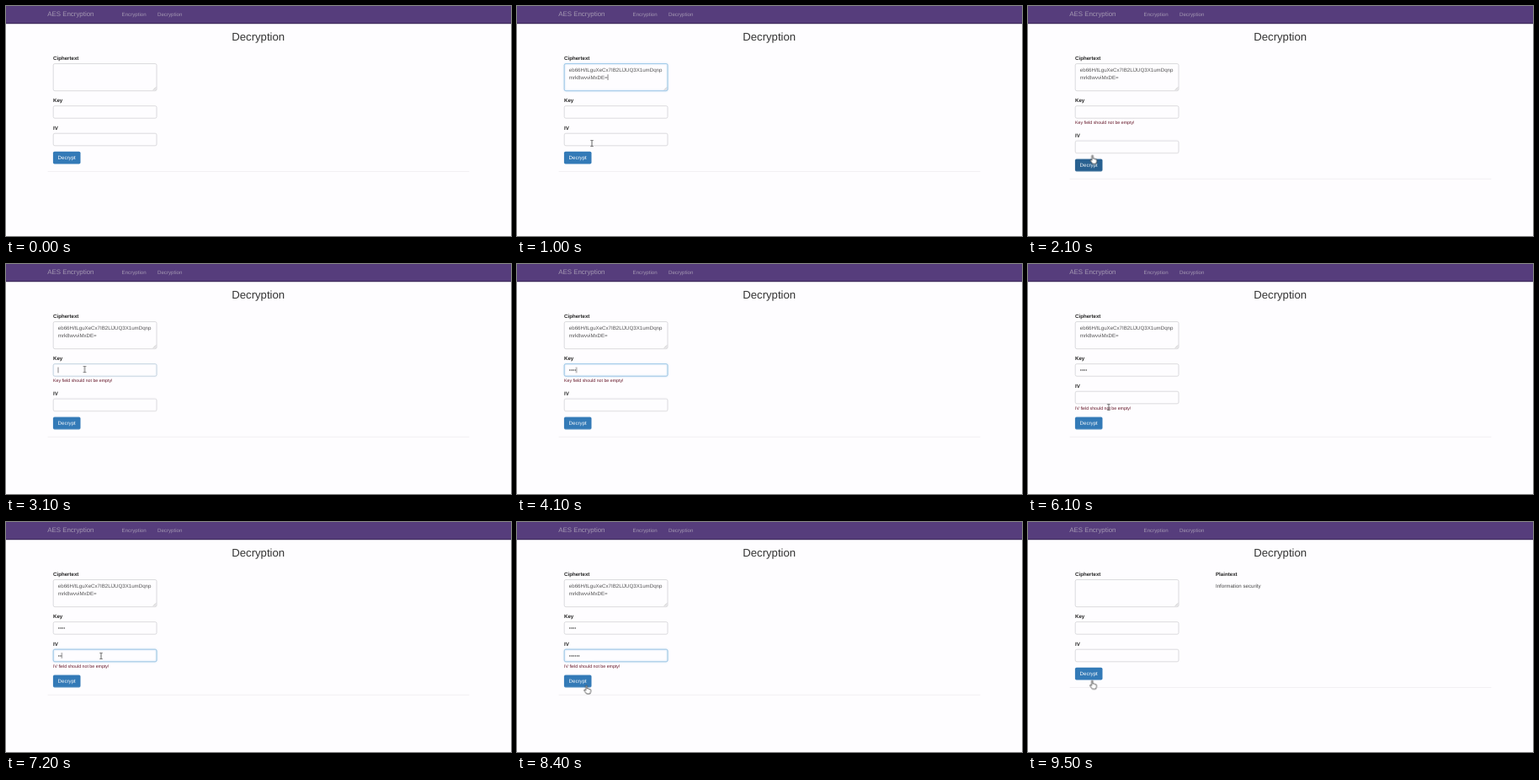
Write an HTML page that moves like this. It is 600x273 px and loops after 10 s.

```html
<!DOCTYPE html>
<html lang="en">
<head>
<meta charset="utf-8">
<title>AES Decryption</title>
<style>
html, body { margin: 0; height: 100%; overflow: hidden; background: #fefdff; }
svg { display: block; width: 100%; height: 100%; }
text {
  font: 6.15px "Liberation Sans", Arial, sans-serif;
  text-rendering: geometricPrecision;
  fill: #555; white-space: pre;
}
.brand { font-size: 7.9px; }
.nav text { fill: #a498b2; }
.title { font-size: 13.18px; text-anchor: middle; fill: #333; }
.label { font-weight: bold; fill: #222; }
.error { font-size: 5.27px; fill: #641426; }
.box { fill: #fefdff; stroke: #c4c4c8; stroke-width: .6; }
.glow { fill: none; stroke: #8fc4ec; stroke-width: .7; filter: drop-shadow(0 0 1px #a9d3f2); }
.caret { stroke: #333; stroke-width: .6; }

/* One percent of the loop is 100 ms. */
.step { animation: 10s step-end infinite; }
.ease { animation: 10s linear infinite; }

.cipher { animation-name: cipher; }
.cipherCaret { animation-name: cipherCaret; }
.keyCaret { animation-name: keyCaret; }
.ivCaret { animation-name: ivCaret; }
.keyType { animation-name: keyType; }
.ivType { animation-name: ivType; }
.keyError { animation-name: keyError; }
.ivError { animation-name: ivError; }
.ivGroup { animation-name: ivGroup; }
.footer { animation-name: footer; }
.plain { animation-name: plain; }
.cipherGlow { animation-name: cipherGlow; }
.keyGlow { animation-name: keyGlow; }
.ivGlow { animation-name: ivGlow; }
.button { fill: #337ab7; animation-name: hover; }
.pointer { animation-name: move; }
.arrow { animation-name: arrow; }
.beam { animation-name: beam; }
.hand { animation-name: hand; }

@keyframes cipher { 0%, 92% { opacity: 0 } 9% { opacity: 1 } }
@keyframes cipherCaret {
  0%, 19% { opacity: 0; transform: none }
  7% { opacity: 1; transform: translate(-46px, -8.8px) }
  9% { opacity: 1; transform: none }
}
@keyframes keyCaret { 0%, 55% { opacity: 0 } 31% { opacity: 1 } }
@keyframes ivCaret { 0%, 82% { opacity: 0 } 67% { opacity: 1 } }
@keyframes keyType {
  0%, 92% { transform: none }
  34% { transform: translateX(2.15px) }
  36% { transform: translateX(4.3px) }
  38% { transform: translateX(6.45px) }
  40% { transform: translateX(8.6px) }
}
@keyframes ivType {
  0%, 92% { transform: none }
  70% { transform: translateX(2.15px) }
  71% { transform: translateX(4.3px) }
  73% { transform: translateX(6.45px) }
  75% { transform: translateX(8.6px) }
  76% { transform: translateX(10.75px) }
  78% { transform: translateX(12.9px) }
}
@keyframes keyError { 0%, 57% { opacity: 0 } 20% { opacity: 1 } }
@keyframes ivError { 0%, 92% { opacity: 0 } 57% { opacity: 1 } }
@keyframes ivGroup { 0%, 57% { transform: none } 20% { transform: translateY(8.8px) } }
@keyframes footer { 0%, 92% { transform: none } 20% { transform: translateY(8.8px) } }
@keyframes plain { 0% { opacity: 0 } 92% { opacity: 1 } }
@keyframes hover {
  0%, 30%, 59%, 95% { fill: #337ab7 }
  13%, 50%, 86% { fill: #286090 }
}
@keyframes cipherGlow { 0%, 7%, 20.5%, 100% { opacity: 0 } 8.5%, 19% { opacity: 1 } }
@keyframes keyGlow { 0%, 30.5%, 56.5%, 100% { opacity: 0 } 32%, 55% { opacity: 1 } }
@keyframes ivGlow { 0%, 67%, 91.5%, 100% { opacity: 0 } 68.5%, 90% { opacity: 1 } }

@keyframes move {
  0%, 5% { transform: translate(104px, 8px) }
  7% { transform: translate(104px, 84px) }
  9% { transform: translate(98px, 100px) }
  10%, 10.9% { transform: translate(89px, 163px) }
  12% { transform: translate(80px, 178px) }
  15% { transform: translate(77px, 177px) }
  16%, 20% { transform: translate(76px, 176px) }
  26%, 29% { transform: translate(79px, 184px) }
  30% { transform: translate(85px, 162px) }
  31%, 45% { transform: translate(93.5px, 125px) }
  48% { transform: translate(82px, 165px) }
  52%, 57% { transform: translate(71.6px, 190.8px) }
  61%, 64% { transform: translate(95.8px, 170px) }
  65%, 67% { transform: translate(98px, 161px) }
  70%, 80% { transform: translate(113px, 159px) }
  84%, 84.9% { transform: translate(82.5px, 194px) }
  88% { transform: translate(77px, 189px) }
  90%, 100% { transform: translate(76.3px, 188.3px) }
}
@keyframes arrow { 0%, 6.5% { opacity: 0 } 5% { opacity: 1 } }
@keyframes beam {
  0%, 12%, 35%, 50%, 75%, 83% { opacity: 0 }
  6.5%, 30%, 45%, 59%, 80% { opacity: 1 }
}
@keyframes hand { 0%, 30%, 59% { opacity: 0 } 12%, 50%, 83% { opacity: 1 } }
</style>
</head>
<body>
<svg viewBox="0 0 600 273" preserveAspectRatio="none">
  <rect width="600" height="273" fill="#fefdff"/>

  <g class="nav">
    <rect width="600" height="21" fill="#563d7c"/>
    <rect y="20.2" width="600" height="1" fill="#382554"/>
    <text class="brand" x="49.2" y="12.3">AES Encryption</text>
    <text x="137.6" y="12">Encryption</text>
    <text x="180" y="12">Decryption</text>
  </g>
  <text class="title" x="299.7" y="40.9">Decryption</text>

  <text class="label" x="56" y="63.9">Ciphertext</text>
  <rect class="box" x="56.2" y="68.5" width="122.8" height="32.2" rx="1.8"/>
  <path d="M174.8 99.8l3.4-3.4M176.8 99.8l1.4-1.4" stroke="#888" stroke-width=".5"/>
  <rect class="glow ease cipherGlow" x="56.2" y="68.5" width="122.8" height="32.2" rx="1.8"/>
  <g class="step cipher">
    <text x="61.8" y="77.8">eb66H/tLguXeCx7IB2LlJUQ3X1umDqnp</text>
    <text x="61.8" y="86.6">mrk8wvviMxDE=</text>
  </g>
  <path class="caret step cipherCaret" d="M108 81.2v6.8"/>

  <text class="label" x="56" y="114.1">Key</text>
  <rect class="box" x="56.2" y="118.6" width="122.8" height="14.6" rx="1.8"/>
  <rect class="glow ease keyGlow" x="56.2" y="118.6" width="122.8" height="14.6" rx="1.8"/>
  <text x="61.8" y="128.1">••••</text>
  <g class="step keyType">
    <rect x="61.8" y="121" width="16" height="10" fill="#fefdff"/>
    <path class="caret step keyCaret" d="M62 122.5v6.8"/>
  </g>
  <text class="error step keyError" x="56" y="140.1">Key field should not be empty!</text>

  <g class="step ivGroup">
    <text class="label" x="56" y="146.7">IV</text>
    <rect class="box" x="56.2" y="151.2" width="122.8" height="14.6" rx="1.8"/>
    <rect class="glow ease ivGlow" x="56.2" y="151.2" width="122.8" height="14.6" rx="1.8"/>
    <text x="61.8" y="160.7">••••••</text>
    <g class="step ivType">
      <rect x="61.8" y="153.6" width="16" height="10" fill="#fefdff"/>
      <path class="caret step ivCaret" d="M62 155.1v6.8"/>
    </g>
  </g>
  <text class="error step ivError" x="56" y="172.6">IV field should not be empty!</text>

  <g class="step footer">
    <rect class="step button" x="55.9" y="172.7" width="32.6" height="14.9" rx="1.8"/>
    <text x="61.6" y="182.4" style="fill:#fff">Decrypt</text>
    <path d="M49.6 196.6H550.4" stroke="#ebeaec" stroke-width=".7"/>
  </g>

  <g class="step plain">
    <text class="label" x="223" y="63.9">Plaintext</text>
    <text x="223" y="77.8" style="fill:#444">Information security</text>
  </g>

  <g class="ease pointer">
    <path class="step arrow" d="M0 0v8l1.9-1.7 1.3 2.9 1.2-.6-1.2-2.8h2.5z" fill="#fff" stroke="#222" stroke-width=".5"/>
    <path class="step beam" d="M-1.6-3.5H-.4L0-3.1.4-3.5H1.6M0-3.1V3.1M-1.6 3.5H-.4L0 3.1.4 3.5H1.6" fill="none" stroke="#222" stroke-width=".7"/>
    <path class="step hand" d="M-.8 6V.6Q-.8-.2 0-.2T.8.6V3.8Q2.2 3 2.4 4.2 3.7 3.5 3.9 4.7 5.2 4.2 5.2 5.6V7.4L4.2 10H.2L-2.6 6.2Q-3 4.9-1.8 5.1z" fill="#fff" stroke="#222" stroke-width=".7" stroke-linejoin="round"/>
  </g>
</svg>
</body>
</html>
```
